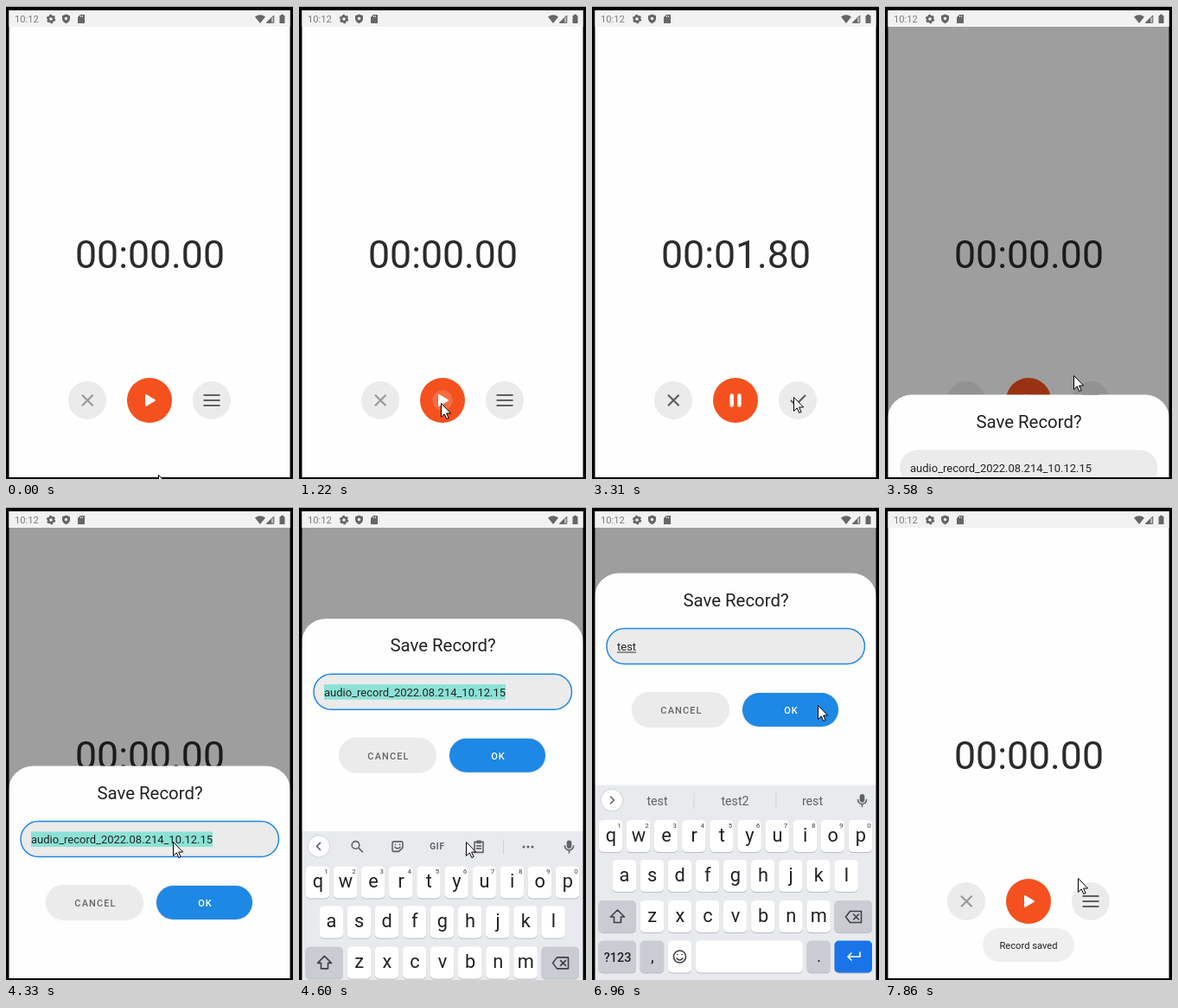
An HTML page for the animation above (8000 ms loop, 332 px wide and 547 px high).

```html
<!DOCTYPE html>
<html lang="en">
<head>
<meta charset="utf-8">
<title>Voice recorder</title>
<style>
html, body { margin: 0; width: 100%; height: 100%; overflow: hidden; background: #fefefe; }
svg { display: block; font-family: Roboto, sans-serif; }
.mid { text-anchor: middle; }
.line { fill: none; stroke: #5f6368; stroke-width: 1.6; stroke-linecap: round; stroke-linejoin: round; }
.bold { font-weight: 500; }
.button { font-size: 11px; font-weight: 500; letter-spacing: 1.1px; text-anchor: middle; }
.shadow { filter: drop-shadow(0 .7px .8px #0003); }
</style>
</head>
<body>
<svg width="332" height="547" viewBox="0 0 332 547">
  <rect width="332" height="547" fill="#fefefe"/>

  <g id="recorder">
    <text id="timer" class="mid" x="166.5" y="302.5" font-size="44.6" fill="#2b2b2b"></text>
    <g fill="#ebebeb"><circle cx="94" cy="456" r="22"/><circle cx="238" cy="456" r="22"/></g>
    <circle cx="166" cy="456" r="26" fill="#f4511e"/>
    <circle id="ripple" cx="166" cy="456" fill="#fff" opacity=".16"/>
    <path id="discard" d="M88 449.7l12.6 12.6m0-12.6l-12.6 12.6" fill="none" stroke-width="2.2"/>
    <g id="idle">
      <path d="M162 450v12l10-6z" fill="#fff" stroke="#fff" stroke-width="2" stroke-linejoin="round"/>
      <path d="M228.5 450h19m-19 6h19m-19 6h19" stroke="#5f5f5f" stroke-width="2"/>
    </g>
    <g id="running">
      <path d="M161.7 450.5v11m8.7-11v11" stroke="#fff" stroke-width="4.5" stroke-linecap="round"/>
      <path d="M230 456l5.5 5.5 11.5-11.5" fill="none" stroke="#5f5f5f" stroke-width="2.2"/>
    </g>
  </g>

  <g id="toast">
    <rect x="113" y="487" width="106" height="39" rx="19.5" fill="#efefef"/>
    <text id="toastText" class="mid" x="166" y="511" font-size="11.2" fill="#222">Record saved</text>
  </g>

  <rect id="scrim" y="24" width="332" height="523"/>

  <g id="sheet">
    <path d="M3 300V28a28 28 0 0 1 28-28h270a28 28 0 0 1 28 28v500H3z" fill="#fefefe"/>
    <text class="mid" x="166.5" y="38" font-size="20.4" fill="#222">Save Record?</text>
    <rect id="field" x="17" y="64" width="298.5" height="41" rx="20.5" fill="#ebebeb" stroke-width="1.5"/>
    <rect id="selection" x="29" y="76" width="210" height="17.5" fill="#8ce2d6"/>
    <text id="name" x="29" y="89.5" font-size="13" fill="#222"></text>
    <path id="underline" stroke="#333"/>
    <rect id="caret" y="79.5" width="1" height="15" fill="#444"/>
    <g class="shadow">
      <rect x="47" y="138.5" width="111" height="39" rx="19.5" fill="#ebebeb"/>
      <rect x="174" y="138.5" width="111" height="39" rx="19.5" fill="#1e88e5"/>
    </g>
    <text class="button" x="103.5" y="162.4" fill="#666">CANCEL</text>
    <text class="button" x="230.5" y="162.4" fill="#fff">OK</text>
    <g id="menu">
      <rect class="shadow" x="45" y="32" width="178" height="37.5" rx="5" fill="#fff"/>
      <g class="bold" font-size="11" fill="#111">
        <text x="58" y="55">Cut</text><text x="92.5" y="55">Copy</text>
        <text x="135.5" y="55">Paste</text><text x="181" y="55">Share</text>
      </g>
      <path d="M29 93.5v8.7a8.7 8.7 0 1 1-8.7-8.7zM239 93.5v8.7a8.7 8.7 0 1 0 8.7-8.7z" fill="#6200ee"/>
    </g>
  </g>

  <path d="M0 545h332v2H0z"/>

  <g id="keyboard">
    <rect x="3" y="321.5" width="326" height="226" fill="#e8eaed"/>
    <circle class="shadow" cx="23" cy="339" r="12" fill="#fff"/>
    <path id="chevron" class="line"/>
    <g id="tools">
      <g class="line">
        <circle cx="65.5" cy="337.5" r="4.3"/><path d="M69 341l4.5 4.5"/>
        <path d="M110 333.5h8a2 2 0 0 1 2 2v5l-4.5 4.5H110a2 2 0 0 1-2-2v-7.500a2 2 0 0 1 2-2zM111 340q3 3 6 0M111.500 337h.1m5 0h.1"/>
        <path d="M203 334h10v12h-10zM206 333h4v2h-4zM205.500 338.500h5m-5 3h5"/>
      </g>
      <text class="mid" x="160" y="343" font-size="10" font-weight="700" letter-spacing=".7" fill="#5f6368">GIF</text>
      <path d="M236.5 331v17" stroke="#cfd1d4"/>
      <g fill="#5f6368"><circle cx="260" cy="339.5" r="1.5"/><circle cx="265" cy="339.5" r="1.5"/><circle cx="270" cy="339.5" r="1.5"/></g>
    </g>
    <g id="words" class="mid" font-size="14.2" fill="#5f6368">
      <path d="M118 331v18m95-18v18" stroke="#cfd1d4"/>
      <text x="75.5" y="344.5"></text><text x="165.5" y="344.5"></text><text x="255" y="344.5"></text>
    </g>
    <rect x="309.7" y="332" width="5.6" height="9.5" rx="2.8" fill="#5f6368"/>
    <path class="line" d="M307.5 338.5a5 5 0 0 0 10 0M312.5 343.5v3"/>
    <g id="keys"></g>
    <g class="line" style="stroke:#3c4043">
      <path d="M29.5 466l8 8h-4v6.5h-8v-6.5h-4z"/>
      <path d="M293.5 474l5-6.5h13v13h-13zM302.5 471l6 6m0-6l-6 6"/>
      <circle cx="101.5" cy="520" r="7"/><path d="M98 522q3.5 4 7 0M99 517.5h.1m4.9 0h.1"/>
      <path d="M310 515v5h-14m4-4l-4 4 4 4" stroke="#fff"/>
    </g>
  </g>

  <path d="M0 0h332v547h-3.500V5H3.500v542H0z"/>
  <rect width="332" height="1" fill="#bbb"/>
  <rect x="3.5" y="5" width="325" height="19" fill="#f2f2f2"/>
  <g fill="#666">
    <text x="10" y="19" font-size="11.2" fill="#7d7d7d">10:12</text>
    <circle cx="52" cy="15" r="3" fill="none" stroke="#666" stroke-width="2.4"/>
    <circle cx="52" cy="15" r="4.5" fill="none" stroke="#666" stroke-width="1.5" stroke-dasharray="2.7 2.012"/>
    <path d="M69.5 9.5l4.5 1.8v3.2c0 2.8-2 4.7-4.5 5.7-2.5-1-4.5-2.9-4.5-5.7v-3.2z"/>
    <circle cx="69.5" cy="14.5" r="1.7" fill="#f2f2f2"/>
    <path d="M86 10h5v10h-8v-7z"/><path d="M86.5 11v2m2-2v2" stroke="#f2f2f2" stroke-width=".8"/>
    <path d="M288 12.5q6-4.5 12 0l-6 7.5z"/>
    <path d="M301 19.5l9-9v9z" fill="#bbb"/><path d="M301 19.5l6-6v6z"/><path d="M301.5 19.3l8.300-8.300v8.300z" fill="none" stroke="#666"/>
    <path d="M316.5 11h1.500v-1.200h3v1.200h1.500v9h-6z"/>
  </g>

  <path id="cursor" d="M.5.5v16l3.8-3.6 2.5 5.6 2.3-1-2.5-5.500h5z" fill="#fff" stroke="#000"/>
</svg>

<script>
const $ = id => document.getElementById(id);
const show = (id, on) => $(id).style.display = on ? '' : 'none';
const move = (id, x, y) => $(id).setAttribute('transform', `translate(${x} ${y})`);
const ramp = (t, a, b) => Math.min(1, Math.max(0, (t - a) / (b - a)));
const smooth = p => p * p * (3 - 2 * p);

// Keyboard
const PITCH = 32.1;
const key = (x, y, w, fill, label = '', size = 21.8, weight = 400) => `
  <rect x="${x}" y="${y + 1}" width="${w}" height="37" rx="5" fill="#b9bcc1"/>
  <rect x="${x}" y="${y}" width="${w}" height="37" rx="5" fill="${fill}"/>
  <text class="mid" x="${x + w / 2 + .3}" y="${y + (size > 20 ? 25 : 24)}" font-size="${size}" font-weight="${weight}" fill="#202124">${label}</text>`;
const row = (letters, x, y) => [...letters].map((c, i) => key(x + i * PITCH, y, 27.5, '#fff', c)).join('');
const GREY = '#c9cdd3';
$('keys').innerHTML =
  row('qwertyuiop', 7.8, 362) + row('asdfghjkl', 23.5, 408) + row('zxcvbnm', 55.7, 455) +
  [...'1234567890'].map((n, i) => `<text class="mid bold" x="${31.5 + i * PITCH}" y="371" font-size="8" fill="#666">${n}</text>`).join('') +
  key(7.5, 455, 43.5, GREY) + key(280.5, 455, 43.5, GREY) +
  key(7.5, 501.5, 43.5, GREY, '?123', 14.5, 500) + key(55.7, 501.5, 27.5, GREY, ',', 19) +
  key(87.8, 501.5, 27.5, '#fff') + key(119.9, 501.5, 124, '#fff') +
  key(248.5, 501.5, 27.5, GREY, '.', 19) + key(280.5, 501.5, 43.5, '#1a73e8');

// The screen is refreshed only at these moments (ms)
const LOOP = 8000;
const beats = [0, 120, 240, 390, 510, 1220, 1340, 1490, 1610, 1730, 1880, 2030, 2150, 2270, 2430,
  2910, 3030, 3160, 3310, 3430, 3580, 3700, 3820, 3940, 4210, 4330, 4480, 4600, 4720, 4870, 5020, 5140,
  5660, 5780, 5930, 6050, 6300, 6450, 6700, 6840, 6960, 7230, 7350, 7470, 7590, 7740, 7860];

// Pointer track: time, x, y
const track = [[0, 176, 542], [240, 164, 483], [390, 159, 470], [510, 164, 459], [2270, 164, 459],
  [2430, 168, 456], [2790, 168, 456], [3160, 233, 452], [3430, 233, 452], [3820, 193, 387],
  [4720, 193, 387], [4870, 192, 326], [5140, 194, 292], [6290, 194, 292], [6300, 276, 156],
  [6690, 276, 156], [6700, 293, 148], [6960, 261, 229], [7110, 261, 229], [7590, 240, 364], [7860, 223, 429]];

function pointerAt(t) {
  const i = track.findIndex(p => p[0] > t);
  if (i < 0) return track[track.length - 1].slice(1);
  const [a, b] = [track[i - 1], track[i]], p = ramp(t, a[0], b[0]);
  return [1, 2].map(k => a[k] + (b[k] - a[k]) * p);
}

const suggestions = [['t', 'the', 'that'], ['te', 'test', 'tell'], ['tes', 'test', 'tests'], ['test', 'test2', 'rest']];
const typeTimes = [5660, 5780, 5930, 6300];

function draw(t) {
  // Recorder
  const running = t >= 1340 && t < 3430;
  const tenths = running && t >= 1490 ? Math.round(8 + (t - 2030) / 128) : 0;
  $('timer').textContent = `00:0${Math.floor(tenths / 10)}.${tenths % 10}0`;
  show('running', running);
  show('idle', !running);
  $('discard').setAttribute('stroke', running ? '#5f5f5f' : '#999');
  $('ripple').setAttribute('r', t >= 1220 && t < 1730 ? 26 * ramp(t, 1000, 1490) : 0);

  // Dialog and keyboard
  const rise = smooth(ramp(t, 3310, 3940));
  const leave = smooth(ramp(t, 7110, 7470));
  const board = smooth(ramp(t, 4340, 4720)) * (1 - leave);
  const open = t >= 3430 && t < 7470;
  move('sheet', 0, 547 - 247.5 * rise - 223 * board + 247.5 * leave);
  show('sheet', open);
  show('scrim', open);
  $('scrim').setAttribute('opacity', .38 * (1 - leave));
  move('keyboard', 0, 226 * (1 - board));
  show('keyboard', board > 0);

  // Text entry
  const typed = typeTimes.filter(s => s <= t).length;
  $('name').textContent = typed ? 'test'.slice(0, typed) : 'audio_record_2022.08.214_10.12.15';
  $('field').setAttribute('stroke', t >= 4210 ? '#1e88e5' : 'none');
  show('selection', t >= 4330 && !typed);
  show('menu', t >= 5020 && !typed);
  $('menu').setAttribute('opacity', t < 5140 ? .6 : 1);
  const end = 29 + [0, 4.3, 11.1, 17.9, 22.1][typed];
  $('underline').setAttribute('d', typed ? `M29 91.5H${end}` : '');
  $('caret').setAttribute('x', end);
  show('caret', typed && t < 6700);
  show('tools', !typed);
  show('words', typed);
  $('chevron').setAttribute('d', typed ? 'M21.500 335l4 4-4 4' : 'M24.500 335l-4 4 4 4');
  if (typed) document.querySelectorAll('#words text').forEach((e, i) => e.textContent = suggestions[typed - 1][i]);

  // Toast and pointer
  show('toast', t >= 7590);
  $('toastText').setAttribute('opacity', .6 + .4 * ramp(t, 7590, 7740));
  move('cursor', ...pointerAt(t).map(Math.round));
  show('cursor', !(t >= 5660 && t < 6300 || t >= 6450 && t < 6700));
}

function tick() {
  const now = performance.now() % LOOP;
  draw(beats.filter(b => b <= now).pop());
  requestAnimationFrame(tick);
}
tick();
</script>
</body>
</html>
```
